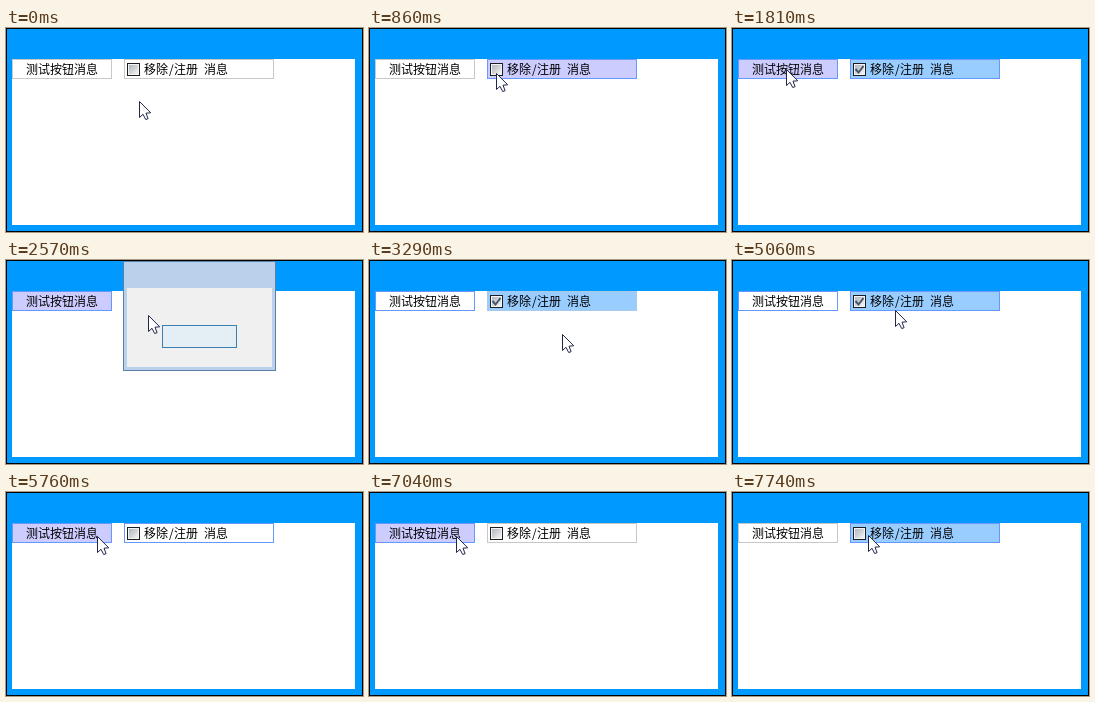
Animation, 357 px wide and 204 px high, one loop 8 s. Source, as an HTML page with a canvas:

```html
<!DOCTYPE html>
<html lang="zh-CN">
<head>
<meta charset="utf-8">
<title>按钮消息</title>
<style>
  html, body { margin: 0; width: 100%; height: 100%; overflow: hidden; }
  canvas { display: block; }
</style>
</head>
<body>
<canvas id="stage" width="357" height="204"></canvas>
<script>
const ctx = document.getElementById('stage').getContext('2d');
const LOOP = 8000, TICK = 30, PRESS = 90;
const BLUE = '#0099ff', HOVER = '#ccccff', DOWN = '#99ccff', FOCUS = '#6699ff', GREY = '#c8c8c8';
const button = { x: 6, y: 31, w: 100, h: 20 };
const check = { x: 118, y: 31, w: 150, h: 20 };
const dialog = { x: 117, y: 1, w: 153, h: 110 };
const confirm = { x: 156, y: 65, w: 75, h: 23 };

// Key points of the pointer: it sets off at `at` and glides for `ms`.
const path = [
  { at: 100, ms: 0, x: 132, y: 62 },
  { at: 560, ms: 180, x: 127, y: 45 },
  { at: 1320, ms: 180, x: 54, y: 52 },
  { at: 1810, ms: 0, x: 54, y: 41 },
  { at: 1840, ms: 90, x: 72, y: 41 },
  { at: 2510, ms: 330, x: 193, y: 66 },
  { at: 3170, ms: 120, x: 193, y: 74 },
  { at: 3750, ms: 360, x: 187, y: 67 },
  { at: 4850, ms: 330, x: 162, y: 49 },
  { at: 5640, ms: 210, x: 87, y: 44 },
  { at: 7440, ms: 240, x: 136, y: 43 }
];

const clicks = [
  { at: 890, on: check }, { at: 1990, on: button }, { at: 3020, on: confirm },
  { at: 5300, on: check }, { at: 5970, on: button }, { at: 6650, on: button },
  { at: 6950, on: button }, { at: 7740, on: check }
];

const easeOut = k => 1 - (1 - k) ** 3;
const inside = (p, r) => p.x >= r.x && p.x < r.x + r.w && p.y >= r.y && p.y < r.y + r.h;

function pointerAt(t) {
  let x = 133, y = 73;
  for (const stop of path) {
    if (t < stop.at) break;
    const step = Math.floor((t - stop.at) / TICK) + 1;
    const k = easeOut(Math.min(1, step / (stop.ms / TICK + 1)));
    x += (stop.x - x) * k;
    y += (stop.y - y) * k;
  }
  return { x: Math.round(x), y: Math.round(y) };
}

// Replays the clicks; the button opens the dialog only while the box is ticked.
function stateAt(t) {
  const state = { checked: false, modal: false, focus: null, down: null };
  for (const { at, on } of clicks) {
    if (t < at) break;
    if (on !== confirm) state.focus = on;
    if (t < at + PRESS) state.down = on;
    else if (on === check) state.checked = !state.checked;
    else state.modal = on === button && state.checked;
  }
  return state;
}

function rect(x, y, w, h, fill) {
  ctx.fillStyle = fill;
  ctx.fillRect(x, y, w, h);
}

function framed({ x, y, w, h }, border, fill) {
  rect(x, y, w, h, border);
  rect(x + 1, y + 1, w - 2, h - 2, fill);
}

function label(text, x) {
  ctx.fillStyle = '#000';
  ctx.fillText(text, x, 46);
}

function drawControl(box, state, hovered, on) {
  const active = state.focus === box || hovered;
  const fill = on || state.down === box ? DOWN : hovered ? HOVER : '#fff';
  framed(box, active ? FOCUS : on ? '#a9c9ea' : GREY, fill);
}

function drawTickBox(checked) {
  framed({ x: 121, y: 35, w: 13, h: 13 }, '#1c1e22', '#f4f4f4');
  const shade = ctx.createLinearGradient(123, 37, 132, 46);
  shade.addColorStop(0, '#b4b9be');
  shade.addColorStop(0.5, '#d0d3d6');
  shade.addColorStop(1, '#f6f6f6');
  rect(123, 37, 9, 9, shade);
  if (!checked) return;
  ctx.strokeStyle = '#46566b';
  ctx.lineWidth = 2;
  ctx.stroke(new Path2D('M123.5 41 L126.5 44.5 L131.5 38'));
}

function drawDialog(pressed) {
  framed(dialog, '#5b7fa6', '#b9d1ea');
  rect(dialog.x + 4, dialog.y + 27, dialog.w - 8, dialog.h - 31, '#f0f0f0');
  framed(confirm, '#3c7fb1', pressed ? '#c4e5f6' : '#e4eef5');
}

function drawPointer({ x, y }) {
  const arrow = new Path2D('M0 0 V16 L3.5 12.8 L6.2 18 L8.6 17.2 L6.5 11.7 L11.2 11.3 Z');
  ctx.save();
  ctx.translate(x + 0.5, y + 0.5);
  ctx.fillStyle = '#fff';
  ctx.fill(arrow);
  ctx.strokeStyle = '#20264a';
  ctx.lineWidth = 1;
  ctx.stroke(arrow);
  ctx.restore();
}

function draw(t) {
  const pointer = pointerAt(t), state = stateAt(t);

  rect(0, 0, 357, 204, '#000');
  rect(1, 1, 355, 202, BLUE);
  rect(6, 31, 343, 166, '#fff');
  ctx.font = '12px "Noto Sans CJK SC", "Noto Sans CJK", sans-serif';

  drawControl(button, state, state.modal || inside(pointer, button), false);
  label('测试按钮消息', 20);

  drawControl(check, state, !state.modal && inside(pointer, check), state.checked);
  drawTickBox(state.checked);
  label('移除', 138);
  label('/', 163);
  label('注册', 168);
  label('消息', 198);

  if (state.modal) drawDialog(state.down === confirm);
  drawPointer(pointer);
}

const started = performance.now();
function frame() {
  draw((performance.now() - started) % LOOP);
  requestAnimationFrame(frame);
}
frame();
</script>
</body>
</html>
```
